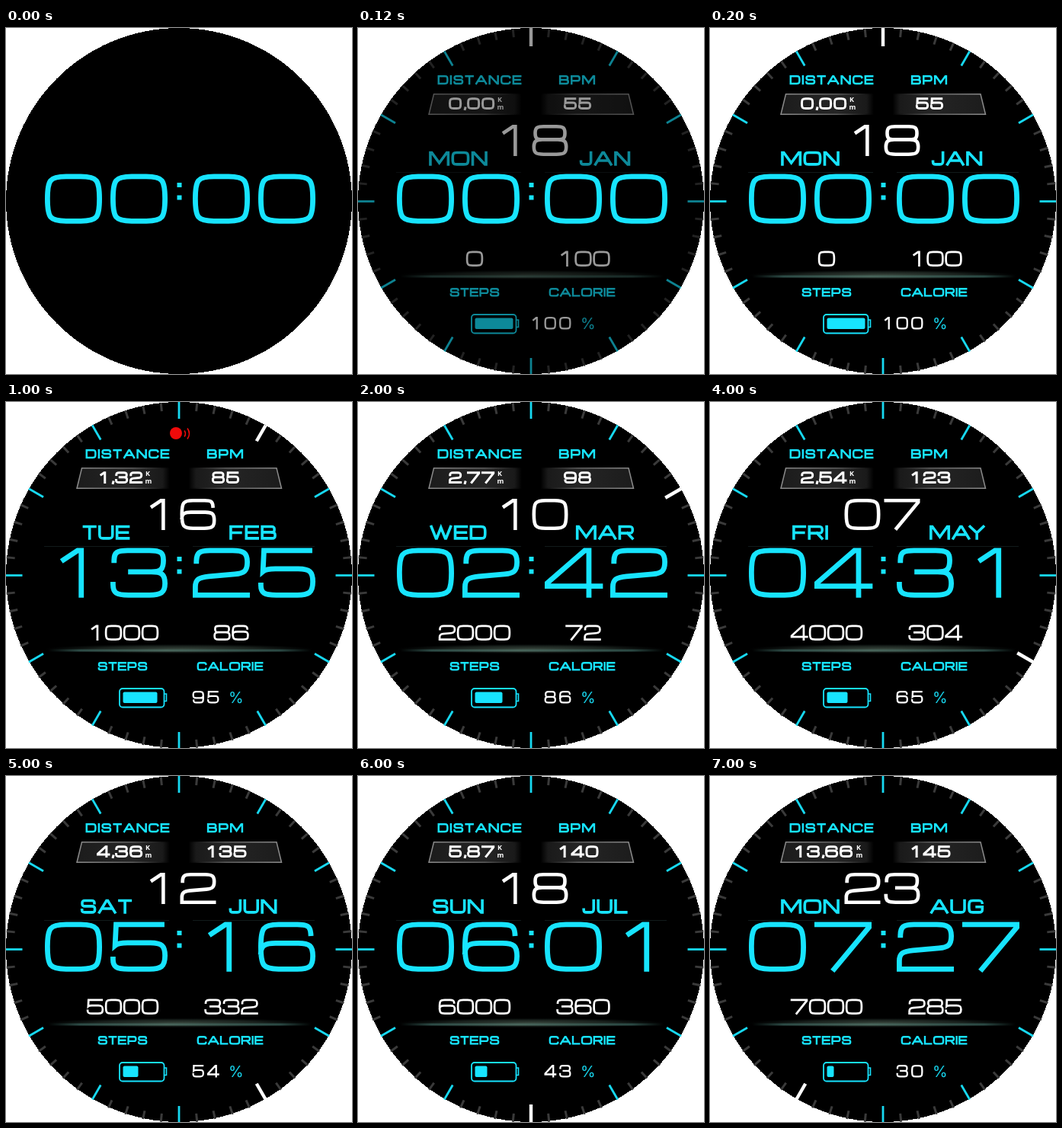
Recreate the animation shown at these times as an HTML page. Size 454 by 454 pixels, loop 8000 ms.

```html
<!DOCTYPE html>
<html lang="en">
<head>
<meta charset="utf-8">
<title>Digital watch face</title>
<style>
  html, body { margin: 0; width: 100%; height: 100%; overflow: hidden; background: #fff; }
  svg { display: block; width: 454px; height: 454px; }
  .ink { fill: none; stroke: #17e4ff; stroke-linecap: square; stroke-miterlimit: 3; }
  .white { stroke: #fff; }
  .unit { font: 700 9px "Noto Sans", sans-serif; fill: #fff; }
  .percent { font: 400 20px Inter, sans-serif; fill: #17d4ec; }
</style>
</head>
<body>
<svg id="face" viewBox="0 0 454 454">
  <defs>
    <linearGradient id="edge">
      <stop offset="0" stop-color="#8c8c8c"/>
      <stop offset=".6" stop-color="#5e5e5e"/>
      <stop offset="1" stop-color="#000"/>
    </linearGradient>
    <linearGradient id="panel">
      <stop offset="0" stop-color="#1c1c1c"/>
      <stop offset=".6" stop-color="#252525"/>
      <stop offset=".92" stop-color="#1a1a1a"/>
      <stop offset="1" stop-color="#000"/>
    </linearGradient>
    <linearGradient id="bar">
      <stop offset="0" stop-color="#23403c" stop-opacity="0"/>
      <stop offset=".12" stop-color="#2c4a45"/>
      <stop offset=".45" stop-color="#48645a"/>
      <stop offset=".88" stop-color="#2a4843"/>
      <stop offset="1" stop-color="#23403c" stop-opacity="0"/>
    </linearGradient>
    <radialGradient id="haze">
      <stop offset="0" stop-color="#4a5c50" stop-opacity=".75"/>
      <stop offset=".6" stop-color="#33423a" stop-opacity=".5"/>
      <stop offset="1" stop-color="#1c2a26" stop-opacity="0"/>
    </radialGradient>
    <path id="plate" d="M99.500 86.700H215V113.300H93Z" fill="url(#panel)" stroke="url(#edge)" stroke-width="1.5"/>
  </defs>
  <circle cx="227" cy="227" r="227" shape-rendering="crispEdges"/>
  <g id="info">
    <g id="ticks"></g>
    <use href="#plate"/>
    <use href="#plate" transform="translate(454.5) scale(-1 1)"/>
    <path d="M50 189.5H214M245 189.5H405" stroke="#111a1b"/>
    <ellipse cx="227" cy="324" rx="176" ry="6.500" fill="url(#haze)"/>
    <rect x="55" y="324.500" width="346" height="3" fill="url(#bar)"/>
    <g id="link" fill="none" stroke="#f00a0a" stroke-width="1.6">
      <circle cx="223" cy="41" r="8" fill="#f00a0a" stroke="none"/>
      <path d="M234 37.5Q237 41.500 234 45.500M238 34.500Q243 41.500 238 48.500"/>
    </g>
    <g id="km" class="unit"><text x="183" y="97">K</text><text x="182.500" y="107">m</text></g>
    <rect x="149" y="376" width="58.500" height="24.500" rx="4" class="ink" stroke-width="1.8"/>
    <path d="M208.500 383h2v9.500h-2" class="ink" stroke-width="1.6"/>
    <rect id="charge" x="153.500" y="380.500" height="14.500" rx="2" fill="#17e4ff"/>
    <text x="292" y="395" class="percent">%</text>
  </g>
  <g fill="#17e4ff"><rect x="224.500" y="203" width="6" height="6"/><rect x="224.500" y="219.500" width="6" height="6"/></g>
</svg>
<script>
const NS = 'http://www.w3.org/2000/svg';
const $ = id => document.getElementById(id);

function add(parent, tag, attrs) {
  const el = document.createElementNS(NS, tag);
  for (const k in attrs) el.setAttribute(k, attrs[k]);
  return parent.appendChild(el);
}

// Centre-line glyphs of a wide square face, drawn in a box 100 high.
const box = w => `M0 50C0 8 4 0 36 0L${w - 36} 0C${w - 4} 0 ${w} 8 ${w} 50C${w} 92 ${w - 4} 100 ${w - 36} 100L36 100C4 100 0 92 0 50Z`;

const digits = {
  0: box(100),
  1: 'M31 21L58 0L65 0L65 100',
  2: 'M2 24C2 5 8 0 28 0L72 0C94 0 100 6 100 26C100 46 94 51 76 53L26 58C6 60 0 66 0 82L0 100L100 100',
  3: 'M2 22C2 4 8 0 28 0L70 0C92 0 97 5 97 22C97 42 92 48 74 48L34 48M74 48C94 48 100 54 100 74C100 95 92 100 70 100L30 100C6 100 0 95 0 76',
  4: 'M80 100L80 0L72 0L0 73L0 80L102 80',
  5: 'M94 0L6 0L4 47C9 42 16 41 28 41L72 41C94 41 100 48 100 70C100 95 92 100 70 100L30 100C6 100 0 95 0 78',
  6: 'M96 20C95 4 90 0 70 0L34 0C4 0 0 8 0 50C0 92 4 100 34 100L70 100C94 100 100 94 100 71C100 48 94 42 72 42L28 42C8 42 1 48 0 62',
  7: 'M0 0L100 0L100 6L33 100',
  8: 'M26 47C8 47 4 42 4 24C4 4 10 0 30 0L70 0C90 0 96 4 96 24C96 42 92 47 74 47ZM26 47C6 47 0 54 0 73C0 95 6 100 30 100L70 100C94 100 100 95 100 73C100 54 94 47 74 47',
  9: 'M4 80C5 96 10 100 30 100L66 100C96 100 100 92 100 50C100 8 96 0 66 0L30 0C6 0 0 6 0 29C0 52 6 58 28 58L72 58C92 58 99 52 100 38',
  ',': 'M9 96L6 107'
};

const letters = {
  A: [133, 'M0 100L61 0L72 0L133 100M24 68L109 68'],
  B: [110, 'M0 0L80 0C100 0 104 6 104 24C104 44 98 48 82 48L0 48M82 48C104 48 110 56 110 74C110 94 104 100 84 100L0 100L0 0'],
  C: [115, 'M115 18C113 3 106 0 86 0L34 0C4 0 0 8 0 50C0 92 4 100 34 100L86 100C106 100 113 97 115 82'],
  D: [120, 'M0 0L84 0C116 0 120 8 120 50C120 92 116 100 84 100L0 100Z'],
  E: [97, 'M97 0L0 0L0 100L97 100M0 50L90 50'],
  F: [94, 'M94 0L0 0L0 100M0 52L84 52'],
  G: [113, 'M112 18C110 3 104 0 84 0L34 0C4 0 0 8 0 50C0 92 4 100 34 100L84 100C108 100 113 94 113 74L113 54L66 54'],
  H: [107, 'M0 0L0 100M107 0L107 100M0 50L107 50'],
  I: [0, 'M0 0L0 100'],
  J: [85, 'M85 0L85 72C85 94 78 100 60 100L24 100C6 100 0 94 0 76'],
  L: [90, 'M0 0L0 100L90 100'],
  M: [152, 'M0 100L0 0L12 0L76 88L140 0L152 0L152 100'],
  N: [114, 'M0 100L0 0L10 0L104 100L114 100L114 0'],
  O: [132, box(132)],
  P: [107, 'M0 100L0 0L82 0C102 0 107 8 107 30C107 54 102 62 82 62L0 62'],
  R: [110, 'M0 100L0 0L84 0C104 0 110 6 110 28C110 50 104 56 84 56L0 56M66 56L108 100'],
  S: [110, 'M106 20C106 4 100 0 82 0L24 0C6 0 2 6 2 24C2 42 8 48 26 48L84 48C104 48 110 54 110 74C110 94 104 100 84 100L26 100C6 100 0 94 0 80'],
  T: [94, 'M0 0L94 0M47 0L47 100'],
  U: [110, 'M0 0L0 70C0 94 6 100 30 100L80 100C104 100 110 94 110 70L110 0'],
  W: [165, 'M0 0L40 100L46 100L82 8L119 100L125 100L165 0'],
  Y: [82, 'M-28 0L30 54L86 0M30 54L30 100']
};

const place = (path, x, y, sx, sy) => path.replace(/(-?\d+) (-?\d+)/g,
  (_, a, b) => `${(x + a * sx).toFixed(2)} ${(y + b * sy).toFixed(2)}`);

// Styles give outer top, outer size, stroke and advance (digits) or gap (letters).
const num = {
  time: { y: 191.5, w: 75, h: 65.2, s: 6.8, step: 86 },
  date: { y: 127, w: 47, h: 41, s: 4.6, step: 52 },
  count: { y: 292.5, w: 22.5, h: 20.5, s: 2.7, step: 24 },
  small: { y: 91.2, w: 17.2, h: 15.8, s: 3, step: 19 },
  power: { y: 379, w: 15.5, h: 16.5, s: 2.3, step: 19.5 }
};
const word = {
  title: { y: 62, h: 12.2, s: 2.5, gap: 2 },
  foot: { y: 341, h: 11.6, s: 2.4, gap: 1.3 },
  name: { y: 161.7, h: 19, s: 3.6, gap: 2.3 }
};

function numPath(text, st, x) {
  let d = '';
  for (const c of text) {
    d += place(digits[c], x + st.s / 2, st.y + st.s / 2, (st.w - st.s) / 100, (st.h - st.s) / 100);
    x += c === ',' ? 5 : st.step;
  }
  return d;
}
const numMid = (text, st, mid) =>
  numPath(text, st, mid - ((text.length - 1) * st.step + st.w) / 2);

function wordPath(text, st, mid) {
  const k = (st.h - st.s) / 100;
  const width = c => letters[c][0] * k + st.s + st.gap;
  let x = mid - ([...text].reduce((sum, c) => sum + width(c), 0) - st.gap) / 2;
  let d = '';
  for (const c of text) {
    d += place(letters[c][1], x + st.s / 2, st.y + st.s / 2, k, k);
    x += width(c);
  }
  return d;
}

const face = $('face'), info = $('info');
const line = (parent, st, white) =>
  add(parent, 'path', { class: white ? 'ink white' : 'ink', 'stroke-width': st.s });
function show(el, text, d) {
  el.setAttribute('d', d);
  el.setAttribute('aria-label', text);
}

for (const [text, st, mid] of [
  ['DISTANCE', word.title, 159.5], ['BPM', word.title, 287.5],
  ['STEPS', word.foot, 153], ['CALORIE', word.foot, 294]
]) show(line(info, st), text, wordPath(text, st, mid));

const ticks = [];
for (let i = 0; i < 60; i++) {
  const hour = i % 5 === 0;
  const tick = add($('ticks'), 'path', {
    d: `M227 0V${hour ? 22 : 11}`, transform: `rotate(${i * 6} 227 227.5)`,
    stroke: hour ? '#17d9f2' : '#3a3a3a', 'stroke-width': 3
  });
  if (hour) ticks.push(tick);
}

const out = {
  time: line(face, num.time),
  date: line(info, num.date, true),
  day: line(info, word.name),
  month: line(info, word.name),
  dist: line(info, num.small, true),
  bpm: line(info, num.small, true),
  steps: line(info, num.count, true),
  cal: line(info, num.count, true),
  power: line(info, num.power, true)
};

// day, month, date, time, distance, pulse, steps, calories, battery, fill width, link icon
const states = `MON JAN 18 0000 0,00 55 0 100 100 50 0
TUE FEB 16 1325 1,32 85 1000 86 95 45 1
WED MAR 10 0242 2,77 98 2000 72 86 36 0
THU APR 01 1512 9,09 110 3256 24 70 27 1
FRI MAY 07 0431 2,54 123 4000 304 65 27 0
SAT JUN 12 0516 4,36 135 5000 332 54 20 0
SUN JUL 18 0601 5,87 140 6000 360 43 16 0
MON AUG 23 0727 13,66 145 7000 285 30 9 0`.split('\n').map(row => row.split(' '));

function setState(i) {
  const [day, month, date, time, dist, bpm, steps, cal, power, fill, link] = states[i];
  const long = dist.length > 4;
  show(out.day, day, wordPath(day, word.name, 131.5));
  show(out.month, month, wordPath(month, word.name, 324));
  show(out.date, date, numPath(date, num.date, 176.5));
  show(out.time, time, numPath(time.slice(0, 2), num.time, 51) + numPath(time.slice(2), num.time, 245));
  show(out.dist, dist, numPath(dist, num.small, long ? 108 : 119));
  show(out.bpm, bpm, numMid(bpm, num.small, 288));
  show(out.steps, steps, numMid(steps, num.count, 153));
  show(out.cal, cal, numMid(cal, num.count, 295.5));
  show(out.power, power, numPath(power, num.power, 283.5 - power.length * num.power.step));
  $('km').setAttribute('transform', `translate(${long ? 9 : 0})`);
  $('charge').setAttribute('width', fill);
  $('link').setAttribute('visibility', link === '1' ? 'visible' : 'hidden');
  ticks.forEach((tick, h) => {
    const on = h === i;
    tick.setAttribute('stroke', on ? '#fff' : '#17d9f2');
    tick.setAttribute('stroke-width', on ? 4.4 : 2.8);
    tick.setAttribute('d', `M227 0V${on ? 24 : 22}`);
  });
}

let current = -1;
function draw(ms) {
  const t = ms % 8000;
  const i = Math.floor(t / 1000);
  if (i !== current) setState(current = i);
  info.setAttribute('opacity', Math.min(1, Math.floor(t / 40) / 5));
}

const start = performance.now();
function loop() {
  draw(performance.now() - start);
  requestAnimationFrame(loop);
}
loop();
</script>
</body>
</html>
```
